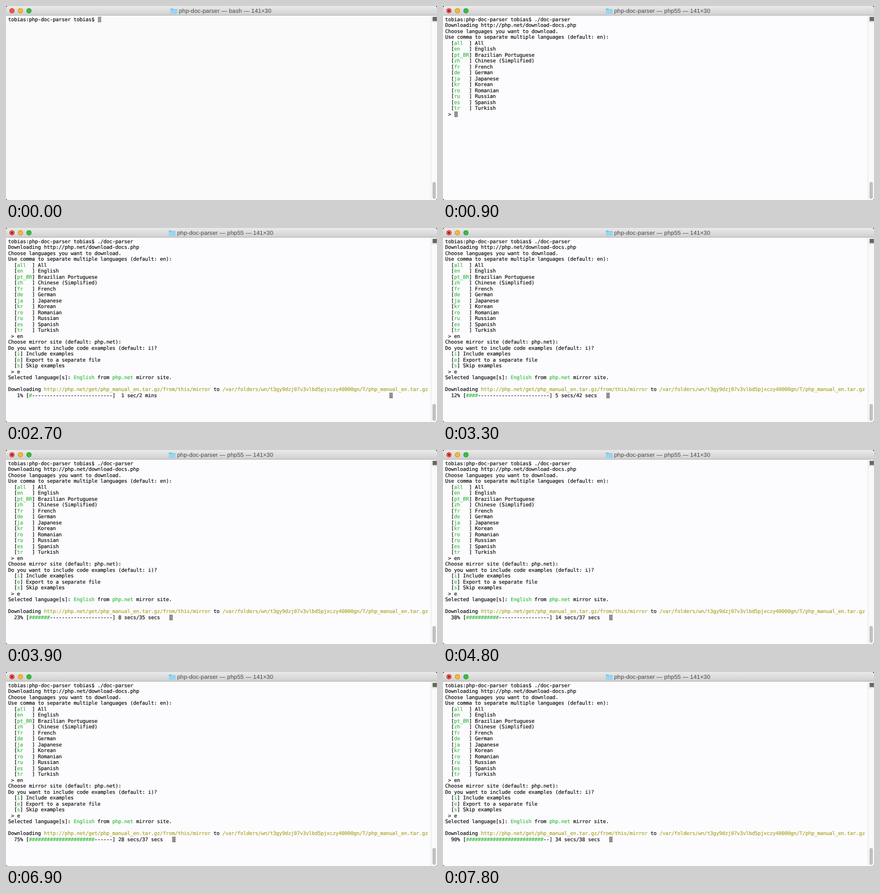
Write an HTML page that moves like this. It is 760 px wide and 344 px high and loops after 8000 ms.

```html
<!DOCTYPE html>
<html lang="en">
<head>
<meta charset="utf-8">
<title>Terminal</title>
<style>
  html, body { margin: 0; width: 760px; height: 344px; overflow: hidden; background: #000; }
  #win { position: relative; width: 760px; height: 344px; overflow: hidden;
    background: #fcfbfd; border-radius: 4px 4px 3px 3px; text-rendering: geometricPrecision; }
  #win.idle { background: #fafafa; }
  #win * { box-sizing: border-box; }
  #bar { position: absolute; width: 760px; height: 17px; border-bottom: 1px solid #b4b3b4;
    background: linear-gradient(#ebeaeb, #d1d0d1); }
  #title { height: 17px; padding-right: 2px; display: flex; gap: 3px; justify-content: center;
    align-items: center; white-space: pre; color: #444;
    font: 10.2px/16px "Liberation Sans", Arial, sans-serif; letter-spacing: .2px; }
  #name { position: relative; top: 1px; }
  .light { position: absolute; top: 3.5px; width: 9px; height: 9px; border-radius: 50%;
    border: .5px solid #0003; }
  #dot { position: absolute; left: 9px; top: 6.5px; width: 3px; height: 3px;
    border-radius: 50%; background: #6d0d0a; }
  .idle #dot { display: none; }
  #track { position: absolute; left: 749px; top: 17px; width: 11px; height: 327px;
    border-left: 1px solid #e6e6e6; background: #fafafa; }
  #thumb { position: absolute; left: 752px; top: 312px; width: 6px; height: 30px;
    border-radius: 3px; background: #c1c1c1; }
  #split { position: absolute; left: 749px; top: 17px; width: 11px; height: 12px;
    border: 1px solid #dcdcdc; border-top: 0; }
  #split::after { content: ""; position: absolute; left: 2px; top: 2px; width: 6px; height: 6px;
    border: 1px solid #8a8583; background: #6b6462; }
  #text { position: absolute; left: 3.75px; top: 19.5px; margin: 0; color: #000;
    font: 9px/10.5px "DejaVu Sans Mono", Menlo, monospace; letter-spacing: calc(5.25px - 1ch);
    -webkit-text-stroke: .12px; }
  #text b { font-weight: 400; color: #2bb936; }
  #text i { font-style: normal; color: #a3a01e; }
  #cursor { position: absolute; width: 6px; height: 10.5px; background: #8d8a8d; }
  .idle #cursor { background: #a59ca1; }
  #cursor svg { display: block; fill: none; stroke: #aea49d; stroke-width: .7; }
  .idle #cursor svg { display: none; }
</style>
</head>
<body>
<div id="win">
  <div id="bar">
    <div id="title">
      <svg width="12" height="11"><path d="M0 1.5h4.5l1 1.2H12V10.5H0z" fill="#74c3e6"/><path d="M0 3.8h12v6.7H0z" fill="#98d6f1"/></svg>
      <span id="name"></span>
    </div>
    <div class="light" style="left:6px;background:#f4524b"></div>
    <div class="light" style="left:21px;background:#f6b932"></div>
    <div class="light" style="left:36px;background:#34bf45"></div>
    <div id="dot"></div>
  </div>
  <div id="track"></div>
  <div id="split"></div>
  <div id="thumb"></div>
  <div id="cursor"><svg width="6" height="10.5"><circle cx="3" cy="3.2" r="1.3"/><path d="M3 4.5V8.5M3 7h1.4"/></svg></div>
  <pre id="text"></pre>
</div>
<script>
const $ = id => document.getElementById(id);
const green = s => `<b>${s}</b>`, olive = s => `<i>${s}</i>`;
const option = (key, label) => `  [${green(key)}] ${label}`;

const prompt = 'tobias:php-doc-parser tobias$ ';
const command = prompt + './doc-parser';
const languages = {
  all: 'All', en: 'English', pt_BR: 'Brazilian Portuguese', zh: 'Chinese (Simplified)',
  fr: 'French', de: 'German', ja: 'Japanese', kr: 'Korean', ro: 'Romanian',
  ru: 'Russian', es: 'Spanish', tr: 'Turkish'
};
const lines = [
  command,
  'Downloading http://php.net/download-docs.php',
  'Choose languages you want to download.',
  'Use comma to separate multiple languages (default: en):',
  ...Object.entries(languages).map(([key, label]) => option(key.padEnd(5), label)),
  ' > en',
  'Choose mirror site (default: php.net):',
  'Do you want to include code examples (default: i)?',
  option('i', 'Include examples'),
  option('e', 'Export to a separate file'),
  option('s', 'Skip examples'),
  ' > e',
  `Selected language[s]: ${green('English')} from ${green('php.net')} mirror site.`,
  '',
  `Downloading ${olive('http://php.net/get/php_manual_en.tar.gz/from/this/mirror')} to ` +
    olive('/var/folders/wn/t3gy9dzj07v3vlbd5pjxczy40000gn/T/php_manual_en.tar.gz')
];

// Dialogue before the download: finished lines, then the line being typed
const dialogue = [
  [0, prompt], [0, command], [2, ''], [16, ' > '], [16, ' > en'],
  [18, ' > '], [22, ' > '], [22, ' > e']
];

// Download: step, percent, elapsed seconds
const keys = [[8, 0, 0], [9, 1, 1], [13, 23, 8], [16, 38, 14], [20, 60, 22], [26, 90, 34]];

function progress(step) {
  const i = Math.max(1, keys.findIndex(k => k[0] >= step));
  const [a, b] = [keys[i - 1], keys[i]];
  const f = (step - a[0]) / (b[0] - a[0]);
  return [1, 2].map(j => Math.round(a[j] + (b[j] - a[j]) * f));
}

function duration(s) {
  if (s < 1) return '< 1 sec';
  if (s < 2) return '1 sec';
  return s < 60 ? s + ' secs' : Math.ceil(s / 60) + ' mins';
}

function download(step) {
  const [percent, secs] = progress(step);
  const done = Math.floor(percent * .28) + 1;
  const total = percent ? Math.round(secs * 100 / percent) : 0;
  const head = String(percent).padStart(4) + '% [';
  const tail = '-'.repeat(28 - done) + '] ' +
    duration(secs).padStart(6) + '/' + duration(total).padEnd(6);
  return {
    last: head.slice(1) + green('#'.repeat(done)) + tail.replaceAll('<', '&lt;'),
    col: step < 10 ? 128 : head.length - 1 + done + tail.length + 3
  };
}

let shown = -1;
function draw(step) {
  let row, last, col;
  if (step < dialogue.length) {
    [row, last] = dialogue[step];
    col = last.length;
  } else {
    row = lines.length;
    ({ last, col } = download(step));
    last = ' ' + last;
    if (step >= 10) col++;
  }
  $('text').innerHTML = [...lines.slice(0, row), last].join('\n');
  $('cursor').style.left = 4 + 5.25 * col + 'px';
  $('cursor').style.top = 18.75 + 10.5 * row + 'px';
  $('win').className = step < 2 ? 'idle' : '';
  $('name').textContent = `php-doc-parser — ${step < 2 ? 'bash' : 'php55'} — 141×30`;
}

function tick() {
  const step = Math.floor(performance.now() % 8000 / 300);
  if (step !== shown) draw(shown = step);
  requestAnimationFrame(tick);
}
tick();
</script>
</body>
</html>
```
